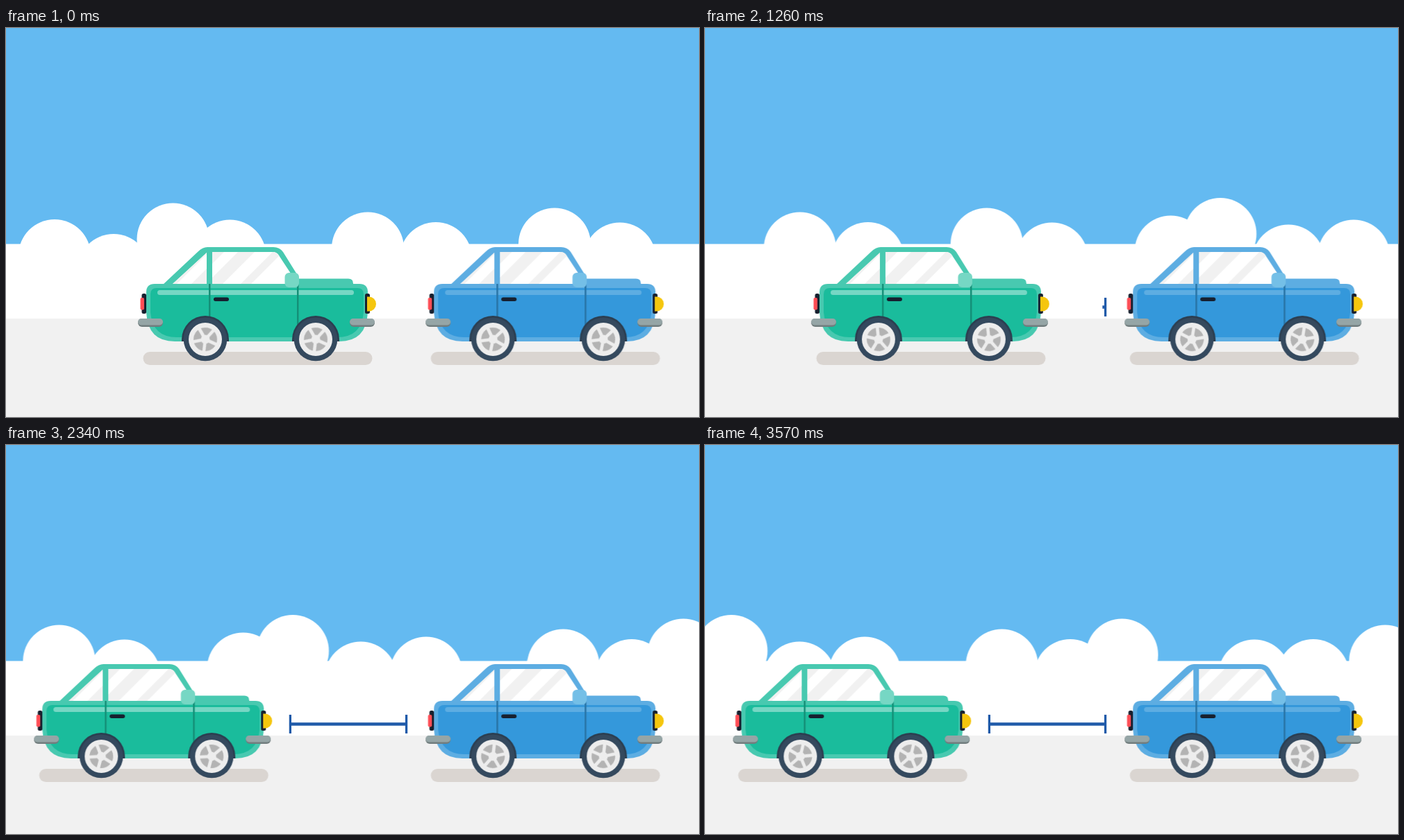
Write an HTML page without scripts that moves like this. It is 998x561 px and loops after 3.6 s.

```html
<!DOCTYPE html>
<html lang="en">
<head>
<meta charset="utf-8">
<title>Safe distance</title>
<style>
  html, body { margin: 0; width: 100%; height: 100%; overflow: hidden; background: #64baf1; }
  svg { display: block; width: 998px; height: 561px; }

  .green { --light: #48c9b0; --main: #1abc9c; --shine: #76d7c4; --mirror: #76d7c4; --seam: #148f77; --turn: 2304deg; }
  .blue  { --light: #5dade2; --main: #3498db; --shine: #5dade2; --mirror: #74bfe7; --seam: #2874a6; --turn: 2541deg; }
  .light { fill: var(--light); }
  .main { fill: var(--main); }
  .shine { fill: var(--shine); }
  .mirror { fill: var(--mirror); }
  .seam { fill: var(--seam); }
  .dark { fill: #17202f; }

  .clouds { animation: drift 3.6s linear infinite; }
  .spin { animation: spin 3.6s linear infinite; }
  .follower { animation: fall-back 3.6s infinite; }
  .gap { animation: reveal 3.6s infinite; }

  @keyframes drift { to { transform: translateX(-1097.3px); } }
  @keyframes spin { to { transform: rotate(var(--turn)); } }
  @keyframes fall-back {
    0%, 21.89% { transform: none; animation-timing-function: cubic-bezier(.333, 0, .667, 1); }
    62.31%, 100% { transform: translateX(-149.7px); }
  }
  @keyframes reveal {
    0%, 32.1% { clip-path: inset(0 0 0 100%); animation-timing-function: cubic-bezier(.333, 0, .667, 1); }
    57.9%, 100% { clip-path: inset(0 0 0 0); }
  }
</style>
</head>
<body>
<svg viewBox="0 0 998 561">
  <defs>
    <circle id="puff" r="52" fill="#fff"/>
    <path id="spoke" d="M0 0V-18" stroke="#ededed" stroke-width="4.6"/>

    <g id="wheel">
      <path d="M-34 3V0a34 34 0 0 1 68 0v3z" fill="#2c3e50"/>
      <circle r="31.3" fill="#34495e"/>
      <circle r="24" fill="#ededed"/>
      <g class="spin">
        <circle r="17" fill="#b3b3b3"/>
        <use href="#spoke"/>
        <use href="#spoke" transform="rotate(72)"/>
        <use href="#spoke" transform="rotate(144)"/>
        <use href="#spoke" transform="rotate(216)"/>
        <use href="#spoke" transform="rotate(288)"/>
        <circle r="6.5" fill="#ededed"/>
      </g>
    </g>

    <g id="bumper">
      <rect y="419" width="36" height="12" rx="5.8" fill="#717d7e"/>
      <rect y="419" width="36" height="9.5" rx="4.7" fill="#95a5a6"/>
    </g>

    <path id="panes" d="M240 369L289 324V369zM297 323H384Q390 323 393 328L416 363V369H297z"/>
    <clipPath id="glass"><use href="#panes"/></clipPath>

    <g id="car">
      <rect x="197.5" y="467" width="330" height="19" rx="9.5" fill="#dad5d1"/>
      <path class="light" d="M226 370L276 323Q283 316 290 316H385Q394 316 399 323L422 360V370zM420 361.5H493Q500 361.5 500 368.5V370H420z"/>
      <use href="#panes" fill="#fff"/>
      <path clip-path="url(#glass)" fill="#f1f1f1" d="M297 323h17l-17 17zM334 323h24l-46 46h-24zM384 323h15l-46 46h-15zM246 369l46-46h-22l-46 46zM289 347v22h-22z"/>

      <path class="light" d="M214 369H509Q521 369 521 381V410Q519 452 480 452H243Q204 452 202 410V381Q202 369 214 369z"/>
      <path class="main" d="M217 375H506Q515 375 515 384V410Q512 446 477 446H246Q211 446 208 410V384Q208 375 217 375z"/>
      <rect class="shine" x="218" y="378" width="283" height="7" rx="3.5"/>
      <path class="seam" d="M292 369h2.5v50H292zM419 369h2.5v60H419z"/>
      <rect class="mirror" x="401.5" y="353" width="20.5" height="21" rx="6"/>
      <rect class="dark" x="299" y="388.5" width="22" height="5.5" rx="2.7"/>

      <rect class="dark" x="195.5" y="383" width="6.5" height="29" rx="2.5"/>
      <rect x="193.5" y="389" width="5.5" height="17.5" rx="2" fill="#ff4d55"/>
      <rect class="dark" x="517" y="383" width="7" height="29" rx="2.5"/>
      <path d="M520 387.5H522.5a10.5 10.5 0 0 1 0 21H520z" fill="#f5c60e"/>

      <use href="#bumper" x="190"/>
      <use href="#bumper" x="495"/>
      <use href="#wheel" x="287" y="449"/>
      <use href="#wheel" x="446" y="449"/>
    </g>
  </defs>

  <rect width="998" height="561" fill="#64baf1"/>
  <g class="clouds">
    <use href="#puff" x="70" y="328"/>
    <use href="#puff" x="155" y="349"/>
    <use href="#puff" x="240.5" y="304.5"/>
    <use href="#puff" x="322.5" y="328.5"/>
    <use href="#puff" x="521" y="317.5"/>
    <use href="#puff" x="619" y="332"/>
    <use href="#puff" x="790" y="311.5"/>
    <use href="#puff" x="884" y="332.5"/>
    <use href="#puff" x="1055" y="322.5"/>
    <use href="#puff" x="1126.5" y="297"/>
    <use href="#puff" x="1224.5" y="335.5"/>
    <use href="#puff" x="1318.5" y="328.5"/>
    <use href="#puff" x="1516" y="317.5"/>
    <use href="#puff" x="1614.5" y="332"/>
    <use href="#puff" x="1689" y="302.5"/>
    <use href="#puff" x="1879.5" y="332.5"/>
    <use href="#puff" x="1964.5" y="332"/>
    <use href="#puff" x="2068" y="311.5"/>
  </g>
  <rect y="311.5" width="998" height="108" fill="#fff"/>
  <rect y="419" width="998" height="142" fill="#f1f1f1"/>

  <path class="gap" fill="#1f5aa9" d="M407.5 389h3.5v11.2h164V389h3.5v27H575v-11.3H411V416h-3.5z"/>
  <g class="follower"><use class="green" href="#car"/></g>
  <use class="blue" href="#car" x="414.3"/>
</svg>
</body>
</html>
```
